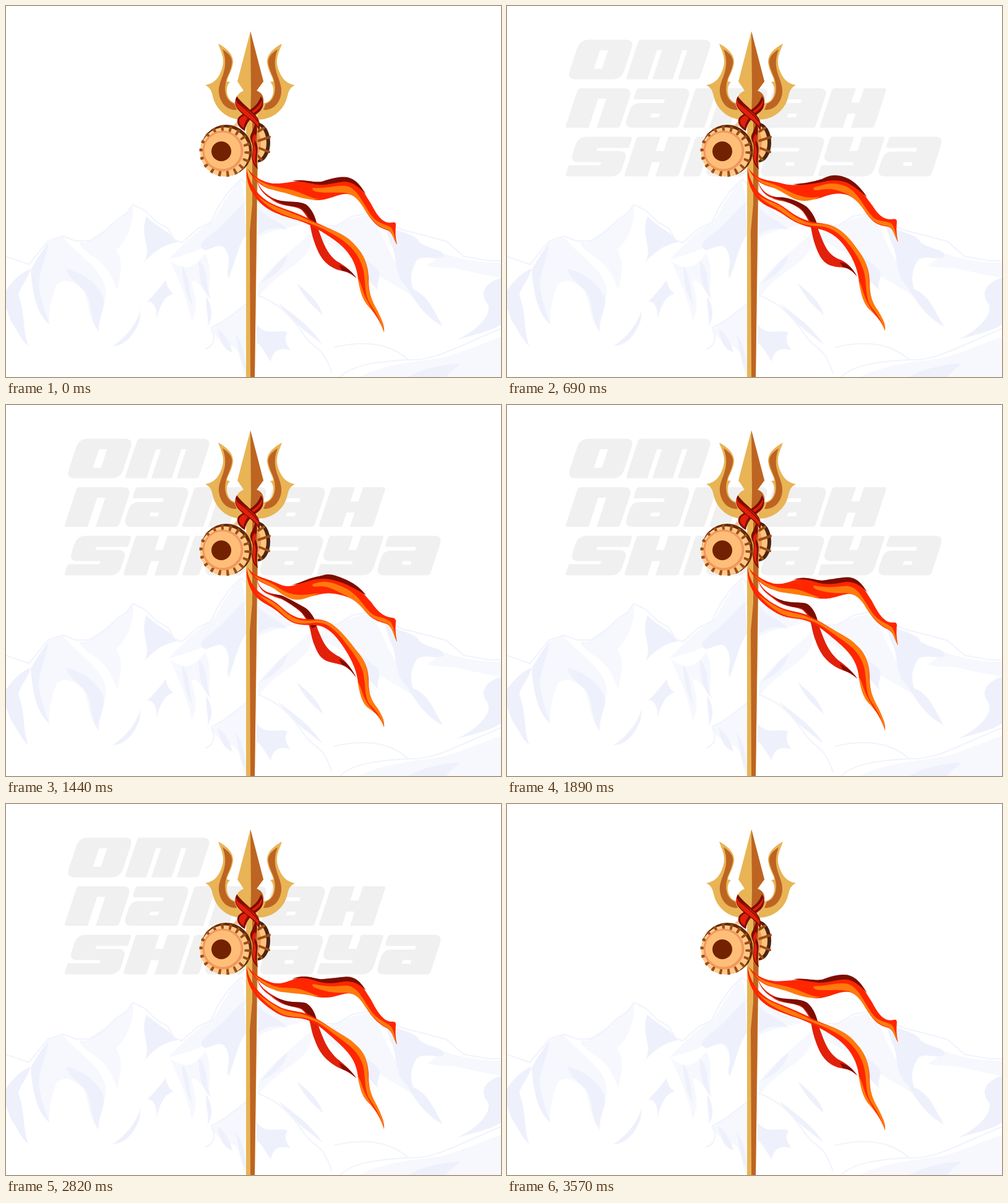
Recreate the animation shown at these times as an HTML page. Size 800 by 600 pixels, loop 3600 ms.

```html
<!DOCTYPE html>
<html lang="en">
<head>
<meta charset="utf-8">
<title>Trident</title>
<style>
  html, body { margin: 0; width: 100%; height: 100%; overflow: hidden; background: #fff; }
  svg { display: block; width: 800px; height: 600px; }
  .gold { fill: #e8b455; } .bronze { fill: #bd6422; }
  .pale { fill: #f6f8fe; } .shade { fill: #eef1fc; }
  .red { fill: #ff2600; } .crimson { fill: #e3200a; } .maroon { fill: #7d0d02; } .orange { fill: #ff7a0c; }
  .rope { fill: none; stroke: #a04c14; stroke-width: 4; stroke-linecap: round; }
</style>
</head>
<body>
<svg viewBox="0 0 800 600">
  <g id="mountains">
    <g class="pale">
      <path d="M40 425L68 382 92 373C112 400 150 420 160 452 165 480 150 500 150 527 132 505 135 480 125 460 110 445 95 440 82 450 75 470 68 490 70 515 50 490 42 455 40 425Z"/>
      <path d="M205 322C190 345 150 368 128 383 108 378 125 395 140 405 165 420 172 440 180 460 186 430 190 415 178 395 195 380 208 350 205 322Z"/>
      <path d="M380 282C355 305 345 335 332 350 308 362 282 390 262 410 290 403 312 395 330 385 350 372 380 345 388 320Z"/>
      <path d="M265 412C285 425 300 430 322 400 335 425 325 450 330 472 318 460 310 440 300 445 305 470 312 485 300 510 295 480 285 455 265 412Z"/>
      <path d="M407 312C425 335 450 347 478 352 460 360 440 358 407 375Z"/>
      <path d="M407 450C430 420 460 395 492 368 500 390 480 410 458 425 435 440 420 455 407 472Z"/>
      <path d="M500 372C530 352 560 342 590 337 605 360 615 390 628 412 650 435 655 465 665 475 640 455 610 445 590 425 570 405 540 400 500 372Z"/>
      <path d="M708 400C740 412 770 415 800 415V440C775 435 750 430 730 425 715 422 700 425 680 420Z"/>
      <path d="M570 600C610 580 660 575 700 570 740 560 770 545 800 535V600Z"/>
      <path d="M330 525C350 510 370 495 388 480V600C375 580 385 560 365 550 350 545 340 535 330 525Z"/>
    </g>
    <g class="shade">
      <path d="M0 460C10 445 25 430 40 425 34 445 22 455 20 468 32 500 26 522 36 550 22 538 18 522 8 510L0 488Z"/>
      <path d="M40 428C48 412 55 400 68 384 66 410 50 435 54 458 58 485 66 500 70 515 55 502 44 480 40 428Z"/>
      <path d="M98 425C120 430 145 445 157 470 163 490 146 505 150 527 134 505 140 480 128 462 115 448 100 440 98 425Z"/>
      <path d="M227 340C240 355 264 364 277 382 255 386 240 396 224 414 236 388 215 372 227 340Z"/>
      <path d="M258 443C260 455 266 462 271 465 254 470 250 485 243 506 245 486 236 476 228 478 240 466 250 455 258 443Z"/>
      <path d="M218 490C212 512 196 535 172 550 192 550 208 532 216 508Z"/>
      <path d="M385 318C365 335 352 355 330 370 315 382 310 390 322 395 340 390 350 380 358 400 364 420 354 430 360 440 370 415 376 385 388 370Z"/>
      <path d="M285 420C300 445 295 465 302 485 292 470 285 450 285 420ZM312 412C330 430 320 455 332 475 318 462 310 440 312 412ZM324 470C335 490 334 505 326 518 328 500 322 490 324 470Z"/>
      <path d="M407 325C420 343 440 345 455 362 435 358 425 358 407 370ZM410 448C430 430 440 410 455 403 450 425 430 440 410 448Z"/>
      <path d="M405 515C420 535 440 522 455 528 448 540 454 548 460 557 440 550 430 560 428 575 418 560 410 545 405 545Z"/>
      <path d="M440 480C465 500 490 515 512 548 490 530 465 515 440 480ZM470 448C485 462 505 475 512 500 495 485 480 470 470 448Z"/>
      <path d="M342 522C355 530 362 545 366 560 352 556 345 542 342 522ZM370 530C380 540 386 560 388 590 374 570 378 550 370 530Z"/>
      <path d="M612 355C635 365 665 370 668 382 685 395 708 392 708 406 690 412 680 402 665 410 655 425 652 440 658 458 682 468 690 490 706 518 680 505 662 480 648 455 625 435 634 405 622 385Z"/>
      <path d="M545 385C570 395 582 412 600 425 610 440 596 445 602 460 585 445 570 420 545 385Z"/>
      <path d="M800 440C780 445 765 460 775 477 790 492 770 520 728 540 765 530 785 525 800 515ZM650 600C670 588 700 580 735 578 725 588 715 592 712 600Z"/>
    </g>
    <g fill="none" stroke="#f0f3fc" stroke-width="2">
      <path d="M0 405L37 418 68 380 92 372 112 380 135 380C155 372 165 358 180 345L195 335 205 321 225 331 243 349 262 360 272 378 284 383 310 360 331 350 343 325 360 300 380 280 405 303 420 325 442 342 480 350 505 356 535 355 560 340 587 335 612 347 640 362 680 372 712 381 740 405 780 412 800 412"/>
      <path d="M388 482C365 500 350 512 332 520 340 540 335 550 322 555M407 468C440 480 460 500 480 530 500 560 510 545 527 594M530 552C580 540 620 545 650 572 690 575 720 555 800 522M540 600C560 580 600 575 650 572"/>
    </g>
  </g>

  <g id="lettering" fill="#f0f0f0" fill-rule="evenodd" role="img" aria-label="Om Namah Shivaya"></g>

  <g id="back-drum">
    <ellipse cx="407" cy="221" rx="20" ry="32" fill="#4b2412"/>
    <ellipse cx="403" cy="221" rx="18" ry="29" fill="#fcc37d"/>
    <ellipse cx="400" cy="221" rx="12" ry="23" fill="#ee9a5c"/>
    <path class="rope" d="M408 218L426 212M410 230L425 236M408 203L417 197M405 240L413 249"/>
  </g>

  <g id="trident">
    <g id="prong">
      <path class="gold" d="M343 61C357 68 368 79 367 92 365 106 358 114 357 122L362 123C356 128 355 140 360 149 364 156 371 158 378 157L384 184C362 184 346 173 338 157 332 145 335 134 322 128 334 126 342 119 347 107 356 87 348 76 343 61Z"/>
      <path class="bronze" d="M350 70C360 76 367 84 365 94 362 109 356 115 355 125 352 140 357 154 369 158L373 168C357 169 346 157 344 140 342 119 363 104 350 70Z"/>
    </g>
    <use href="#prong" transform="translate(789) scale(-1 1)"/>
    <path class="gold" d="M388 180H406L407 260 402 600H388Z"/>
    <path class="bronze" d="M398 180H406L406 262 402 600H395L394 365 398 320Z"/>
    <path class="gold" d="M395 41L374 122 384 137C370 143 369 155 376 166L395 192 413 166C420 153 416 141 405 137L416 122Z"/>
    <path class="bronze" d="M395 41L416 122 405 137C416 141 419 151 413 164L395 186 396 140Z"/>
    <path fill="#f6c58b" d="M364 196L374 187 380 194Z"/>
  </g>

  <g id="wrap">
    <path class="maroon" d="M412 146C418 154 417 166 407 173 397 180 388 188 386 202 374 196 370 184 378 178 390 169 405 166 412 146Z"/>
    <path class="crimson" d="M414 152C415 162 408 168 399 174 389 181 386 188 384 197 374 190 375 182 383 178 396 171 408 166 414 152Z"/>
    <path class="maroon" d="M373 146C380 156 392 165 402 175 410 183 412 194 409 202 405 191 394 184 384 176 374 168 366 159 373 146Z"/>
    <path class="crimson" d="M371 152C380 162 394 168 402 178 408 184 409 190 408 196 402 186 392 182 383 173 375 167 370 161 371 152Z"/>
    <path fill="none" stroke="#7d0d02" stroke-width="1.5" d="M373 155C385 166 398 174 407 187"/>
    <path class="maroon" d="M403 190C410 206 399 212 405 222 410 235 402 243 407 264 398 257 395 244 399 234 402 222 390 216 397 205Z"/>
    <path class="crimson" d="M402 207C408 215 398 218 403 228 406 240 400 245 405 259 398 251 397 242 400 232 402 223 393 217 402 207Z"/>
  </g>

  <g id="front-drum">
    <circle cx="356" cy="233.5" r="41.5" fill="#632808"/>
    <circle cx="353.5" cy="236" r="39.7" fill="#fcc987"/>
    <circle cx="354" cy="235" r="36.5" fill="none" stroke="#a04c14" stroke-width="10" pathLength="72" stroke-dasharray="1.3 2.7"/>
    <circle cx="350.5" cy="234.5" r="33" fill="#f0985f"/>
    <circle cx="350" cy="234" r="29.5" fill="#ffbe78"/>
    <circle cx="348" cy="235" r="16" fill="#722200"/>
  </g>

  <g class="ribbon" data-peak="156">
    <path class="crimson" d="M405 278C408 295 420 306 440 315 455 319 472 314 486 322 496 331 501 344 503 356 513 384 518 400 535 413 548 420 558 428 566 440 555 430 546 429 537 427 511 418 504 398 497 378 490 356 494 348 478 330 462 320 446 327 428 312 415 304 406 292 405 278Z"/>
    <path class="maroon" d="M428 309C445 320 470 313 485 321 496 330 500 343 502 352L494 354C491 343 484 332 474 326 455 322 443 322 428 309Z"/>
    <path class="maroon" d="M538 419C550 422 560 430 566 440 557 431 549 429 543 428Z"/>
  </g>
  <g class="ribbon" data-peak="330">
    <path class="red" d="M389 263C392 285 405 305 425 317 445 328 470 333 495 347 520 360 545 367 560 383 580 402 585 420 586 440 586 462 590 475 598 490 606 505 612 515 611 528 606 512 598 500 588 488 574 474 572 455 568 435 564 410 550 392 530 378 510 364 490 352 470 346 440 338 420 330 405 312 393 297 388 282 389 263Z"/>
    <path class="orange" d="M405 305C425 325 460 332 490 347 525 362 550 368 565 388 582 405 585 425 585 442 586 465 592 478 600 492 608 508 611 518 611 528 605 508 597 495 590 484 578 468 582 445 577 425 570 400 555 385 535 373 510 358 490 350 465 343 440 335 420 325 405 305Z"/>
    <path class="orange" d="M568 438C572 458 574 474 588 488 598 500 605 510 610 525 602 505 590 490 583 475 576 462 575 450 568 438Z"/>
  </g>
  <g class="ribbon" data-peak="400">
    <path class="red" d="M390 262C400 276 415 285 432 287 455 288 470 280 495 284 515 288 530 277 548 278 570 282 580 305 590 320 598 335 605 347 616 350 624 352 628 347 630 352 630 362 628 368 632 386 626 378 626 366 615 362 600 358 592 348 584 336 576 322 566 304 550 304 535 304 520 315 500 314 478 311 455 298 432 297 415 295 398 280 390 262Z"/>
    <path class="orange" d="M400 275C420 293 440 292 460 297 480 302 490 311 507 312 490 316 470 308 450 302 425 297 410 290 400 275Z"/>
    <path class="orange" d="M497 294C515 296 535 289 550 291 568 295 576 318 590 338 600 352 612 352 622 358 628 366 628 375 632 386 626 378 625 365 615 361 600 357 590 345 580 330 570 312 560 303 545 302 530 301 515 303 500 300 494 298 494 294 497 294Z"/>
    <path class="maroon" d="M462 283C480 279 495 286 510 284 525 279 540 275 552 277 565 280 573 290 582 305 570 292 560 285 548 284 532 285 520 290 505 289 490 287 478 283 462 283Z"/>
  </g>
</svg>
<script>
const LOOP = 3600, WAVE = 900, FADE = 780;
const lettering = document.querySelector('#lettering');

// Each glyph: width and outline in an upright box 64 high, slanted when placed.
const glyphs = {
  O: [88, 'M14 0H74Q88 0 88 14V50Q88 64 74 64H14Q0 64 0 50V14Q0 0 14 0ZM38 17V47H51V17Z'],
  M: [119, 'M4 0H105Q119 0 119 14V60Q119 64 115 64H84V17H76V64H43V17H35V64H4Q0 64 0 60V4Q0 0 4 0Z'],
  N: [88, 'M4 0H74Q88 0 88 14V60Q88 64 84 64H51V17H38V64H4Q0 64 0 60V4Q0 0 4 0Z'],
  A: [88, 'M4 0H74Q88 0 88 14V60Q88 64 84 64H14Q0 64 0 50V36Q0 24 12 24H51V18H4Q0 18 0 14V4Q0 0 4 0ZM37 41V47H51V41Z'],
  H: [88, 'M4 0H38V23H51V0H84Q88 0 88 4V60Q88 64 84 64H51V41H38V64H4Q0 64 0 60V4Q0 0 4 0Z'],
  S: [88, 'M14 0H84Q88 0 88 4V18H37V23H74Q88 23 88 37V50Q88 64 74 64H4Q0 64 0 60V46H51V41H14Q0 41 0 27V14Q0 0 14 0Z'],
  I: [28, 'M4 0H24Q28 0 28 4V60Q28 64 24 64H4Q0 64 0 60V4Q0 0 4 0Z'],
  V: [81, 'M4 0H34V47H47V0H77Q81 0 81 4V40L60 64H14Q0 64 0 50V4Q0 0 4 0Z'],
  Y: [88, 'M4 0H38V23H51V0H84Q88 0 88 4V50Q88 64 74 64H4Q0 64 0 60V46H51V41H14Q0 41 0 27V4Q0 0 4 0Z']
};

function setLine(word, x, y) {
  for (const letter of word) {
    const [width, d] = glyphs[letter];
    lettering.insertAdjacentHTML('beforeend',
      `<path d="${d}" transform="matrix(1 0 -.33 1 ${x + 21} ${y})"/>`);
    x += width + 7;
  }
}
setLine('OM', 97, 54.5);
setLine('NAMAH', 94, 133);
setLine('SHIVAYA', 94, 211.5);

// Ribbons are sampled once, then shifted by a wave that runs to the right.
const ribbons = [...document.querySelectorAll('.ribbon path')].map(path => {
  const peak = +path.parentNode.dataset.peak, points = [];
  for (let s = 0, end = path.getTotalLength(); s < end; s += 1.5) {
    const { x, y } = path.getPointAtLength(s);
    points.push({ x, y, delay: peak + (x - 450) * 8.9 });
  }
  return { path, points };
});

const clamp = v => Math.max(0, Math.min(1, v));
const swing = t => Math.cos(2 * Math.PI * t / WAVE);

function draw(now) {
  const t = now % LOOP;
  lettering.setAttribute('opacity', Math.min(clamp(t / FADE), clamp((LOOP - 30 - t) / FADE)));
  for (const { path, points } of ribbons) {
    const moved = points.map(({ x, y, delay }) => {
      const lift = 4.2 * clamp((x - 395) / 50) * (swing(t - delay) - swing(delay));
      return x.toFixed(1) + ' ' + (y + lift).toFixed(2);
    });
    path.setAttribute('d', 'M' + moved.join('L') + 'Z');
  }
}

const start = performance.now();
function tick() {
  draw(performance.now() - start);
  requestAnimationFrame(tick);
}
tick();
</script>
</body>
</html>
```
